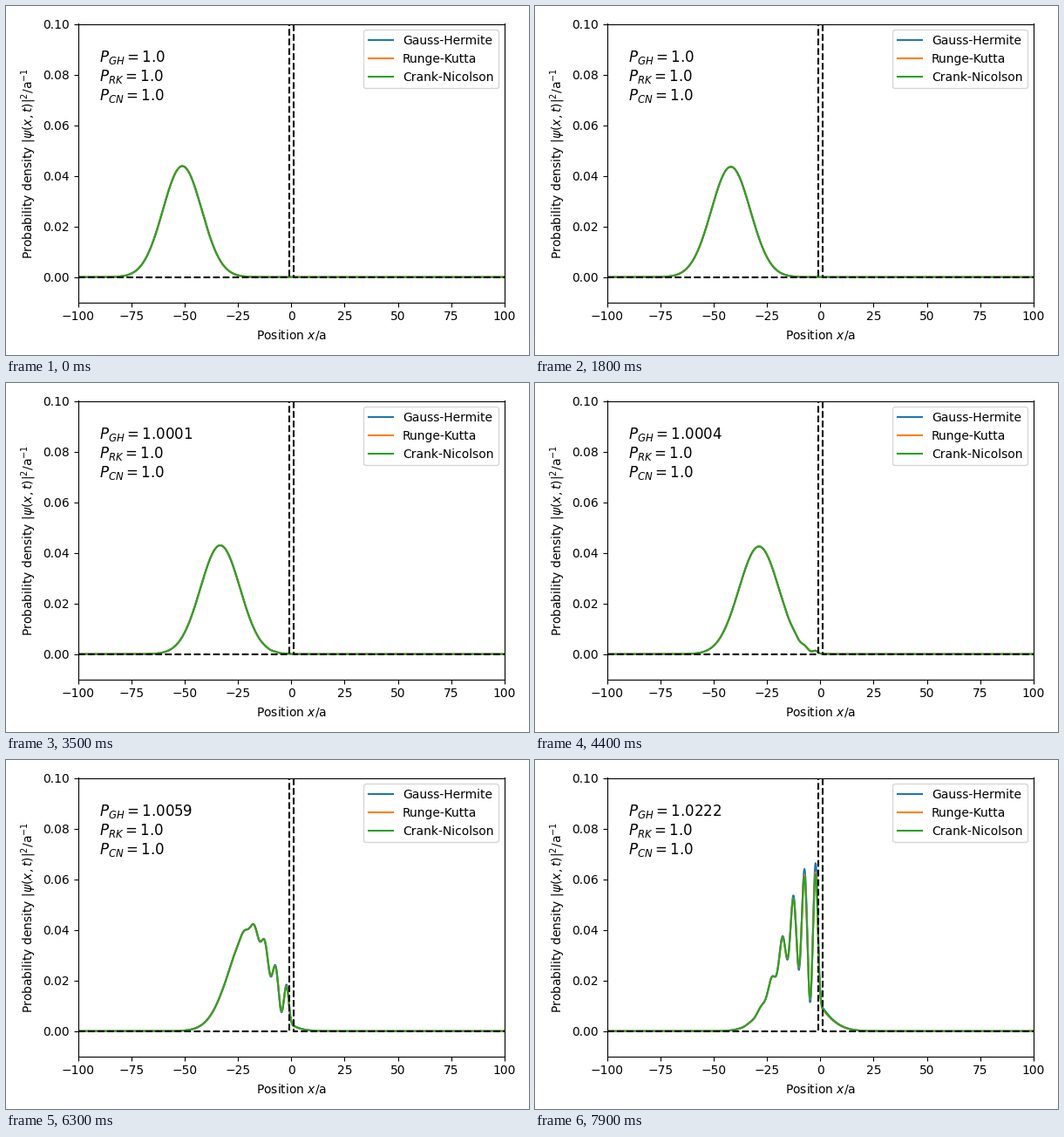
A matplotlib script for the animation above (8 s loop, 600x400 px).

```python
import math

import numpy as np
import matplotlib.pyplot as plt
from matplotlib.animation import FuncAnimation

FRAMES, INTERVAL = 80, 100

# Wave packet (hbar = m = 1)
K0, WIDTH, X0 = 0.572, 9.1, -52.6
DT = 0.508 / K0
T0 = 3 * DT

# Effective barrier on |x| < 1 per solver; an imaginary part adds norm
SOLVERS = [
    ("Gauss-Hermite", "GH", 0.275 + 0.022j),
    ("Runge-Kutta", "RK", 0.267),
    ("Crank-Nicolson", "CN", 0.26),
]

x = np.linspace(-100, 100, 1001)
k = K0 + np.linspace(-0.35, 0.35, 141)
weight = np.exp(-(WIDTH * (k - K0)) ** 2 - 1j * k * X0)
weight *= (k[1] - k[0]) * WIDTH / math.sqrt(math.pi)
weight /= (2 * math.pi * WIDTH ** 2) ** 0.25


def scattering_states(v):
    """Stationary states of a rectangular barrier, one column per k."""
    kappa = np.sqrt(2 * v - k ** 2 + 0j)
    ch, sh = np.cosh(2 * kappa), np.sinh(2 * kappa)
    t = 1 / (ch + 0.5j * (kappa / k - k / kappa) * sh)
    r = -0.5j * (kappa / k + k / kappa) * sh * t
    xs = x[:, None]
    inner = np.clip(xs, -1, 1) - 1
    left = np.exp(1j * k * xs) + r * np.exp(-1j * k * (xs + 2))
    middle = t * np.exp(-1j * k) * (
        np.cosh(kappa * inner) + 1j * k / kappa * np.sinh(kappa * inner))
    right = t * np.exp(1j * k * (xs - 2))
    return np.where(xs < -1, left, np.where(xs > 1, right, middle))


def norm_gh(n):
    z = (n - 81.5) / 15.5
    return 1 + 0.0509 * 0.5 * (1 + math.erf(z / math.sqrt(2)))


states = [scattering_states(v) for _, _, v in SOLVERS]

fig, ax = plt.subplots(figsize=(6, 4), dpi=100)
lines = [ax.plot(x, 0 * x, label=name)[0] for name, _, _ in SOLVERS]
ax.plot([-100, -1, -1, 1, 1, 100], [0, 0, 0.26, 0.26, 0, 0], "k--")
labels = [ax.text(-90, 0.085 - 0.0075 * i, "", fontsize=12)
          for i in range(len(SOLVERS))]
ax.set_xlim(-100, 100)
ax.set_ylim(-0.01, 0.1)
ax.set_xlabel("Position $x$/a")
ax.set_ylabel(r"Probability density $|\psi(x,t)|^2$/a$^{-1}$")
ax.legend(loc="upper right")
fig.tight_layout()


def update(n):
    coeffs = weight * np.exp(-0.5j * k ** 2 * (T0 + n * DT))
    norms = [norm_gh(n), 1.0, 1.0]
    for line, label, phi, solver, p in zip(lines, labels, states, SOLVERS, norms):
        line.set_ydata(np.abs(phi @ coeffs) ** 2)
        label.set_text(f"$P_{{{solver[1]}}}={round(p, 4)}$")
    return lines + labels


anim = FuncAnimation(fig, update, frames=FRAMES, interval=INTERVAL, repeat=True)
plt.show()
```
